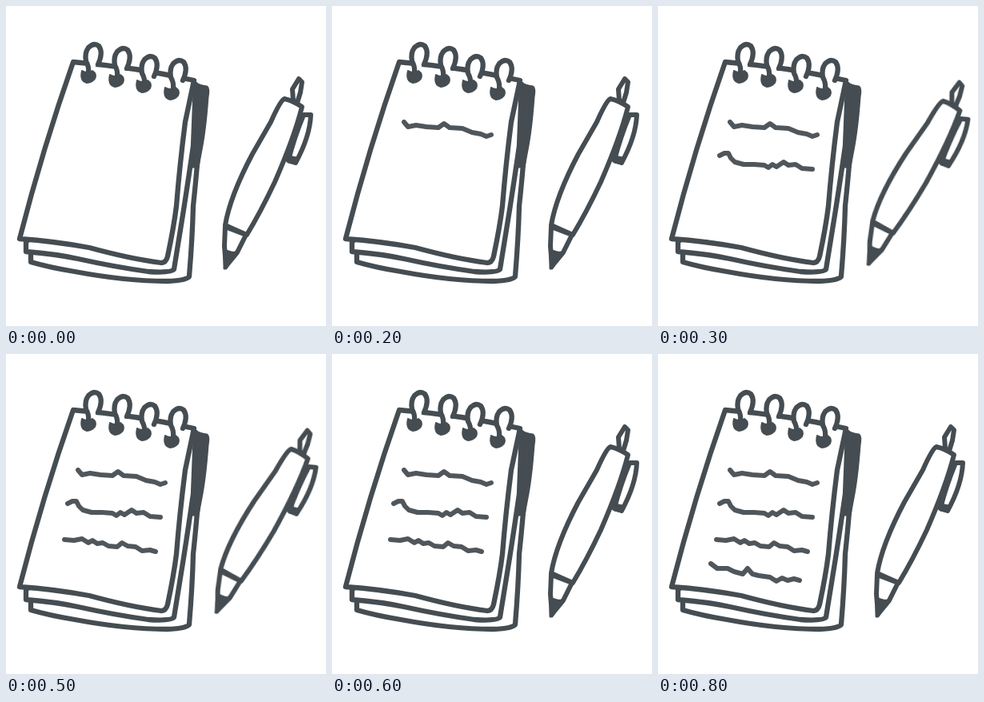
An HTML page that plays this animation: 400x400 px, repeating every 900 ms.

```html
<!DOCTYPE html>
<html lang="en">
<head>
<meta charset="utf-8">
<title>Notepad and pen</title>
<style>
  html, body { margin: 0; width: 100%; height: 100%; overflow: hidden; background: #fff; }
  svg { display: block; width: 100%; height: 100%; }
  .ink { fill: #fff; stroke: #454d52; stroke-width: 6.3; stroke-linecap: round; stroke-linejoin: round; }
  .solid { fill: #454d52; }
  .line { fill: none; stroke: #50575c; stroke-width: 6; opacity: 0; animation: 900ms step-end infinite; }
  .pen { stroke-width: 6; transform-origin: 321.5px 208.5px; animation: tilt 900ms step-end infinite; }
  #line1 { animation-name: write1; }
  #line2 { animation-name: write2; }
  #line3 { animation-name: write3; }
  #line4 { animation-name: write4; }
  @keyframes write1 { 0% { opacity: 0 } 11.1%, 100% { opacity: 1 } }
  @keyframes write2 { 0% { opacity: 0 } 33.3%, 100% { opacity: 1 } }
  @keyframes write3 { 0% { opacity: 0 } 55.5%, 100% { opacity: 1 } }
  @keyframes write4 { 0% { opacity: 0 } 77.7%, 100% { opacity: 1 } }
  @keyframes tilt {
    0%, 22.2%, 44.4%, 66.6%, 88.8%, 100% { transform: none }
    11.1%, 33.3%, 55.5%, 77.7% { transform: rotate(5.3deg) }
  }
</style>
</head>
<body>
<svg viewBox="0 0 400 400">
  <defs>
    <path id="loop" d="M103 83Q104 76 100 69Q98 59 103 52Q110 45 116 50Q122 58 115 73"/>
    <path id="knot" class="solid" stroke-width="2" d="M95 81Q101 85 108 81Q114 85 111 91Q107 96 101 96Q92 94 95 81Z"/>
  </defs>

  <g class="ink">
    <!-- Back pages -->
    <path d="M31 309L31 320Q55 327 86 332Q150 344 201 344Q227 343 229 338Q233 290 234 250Q237 222 239 198L250 104L230 96Z"/>
    <path d="M25 295L25 307Q62 310 90 316Q135 326 178 332Q207 334 210 329Q218 280 222 255Q229 210 234 175L237 98Z"/>
    <path class="solid" stroke-width="3" d="M239 99L251 101Q254 103 252 114Q249 155 244 180L240 201L233 201L233 180Q236 140 239 99Z"/>
    <!-- Front page -->
    <path d="M84 70Q46 178 17 291Q60 294 104 302Q155 316 194 321Q200 321 202 313Q210 275 213 250Q217 200 224 145L235 93Q160 76 84 70Z"/>
    <use href="#loop"/>
    <use href="#loop" x="36" y="5"/>
    <use href="#loop" x="70" y="15"/>
    <use href="#loop" x="106" y="20"/>
    <use href="#knot"/>
    <use href="#knot" x="35" y="5"/>
    <use href="#knot" x="69" y="12"/>
    <use href="#knot" x="104" y="21"/>
  </g>

  <g class="ink">
    <path class="line" id="line1" d="M90 145L95 151L105 149L118 151L133 152L140 147L147 152L163 153L175 158L186 160L193 163L199 161"/>
    <path class="line" id="line2" d="M77 187L83 184L88 184L91 190L96 195L107 198L120 198L133 199L138 202L143 198L148 201L157 195L163 199L172 198L180 203L193 204"/>
    <path class="line" id="line3" d="M73 232L85 233L95 231L103 236L108 233L114 237L121 236L128 240L139 241L145 236L152 240L162 241L170 246L180 245L187 247"/>
    <path class="line" id="line4" d="M66 262L74 268L87 268L95 272L106 275L112 268L118 275L126 277L140 279L148 284L155 280L162 283L170 281L177 283"/>
  </g>

  <g class="ink pen">
    <path d="M359 118L358 104L366 91L370 95L368 108L364 121Z"/>
    <path d="M372 136L381 136Q380 163 362 196L353 193Q360 165 372 136Z"/>
    <path class="solid" stroke-width="3" d="M353 188L363 190L362 197L353 195Z"/>
    <path d="M274 276L273 300L275 325L289 308L300 286Z"/>
    <path class="solid" stroke-width="3" d="M273 305Q282 309 288 308L275 328L273 328Z"/>
    <path d="M348 116Q343 118 331 145L308 185Q280 238 274 274Q287 280 301 286Q318 258 336 220Q360 165 370 126Q358 118 348 116Z"/>
  </g>
</svg>
</body>
</html>
```
